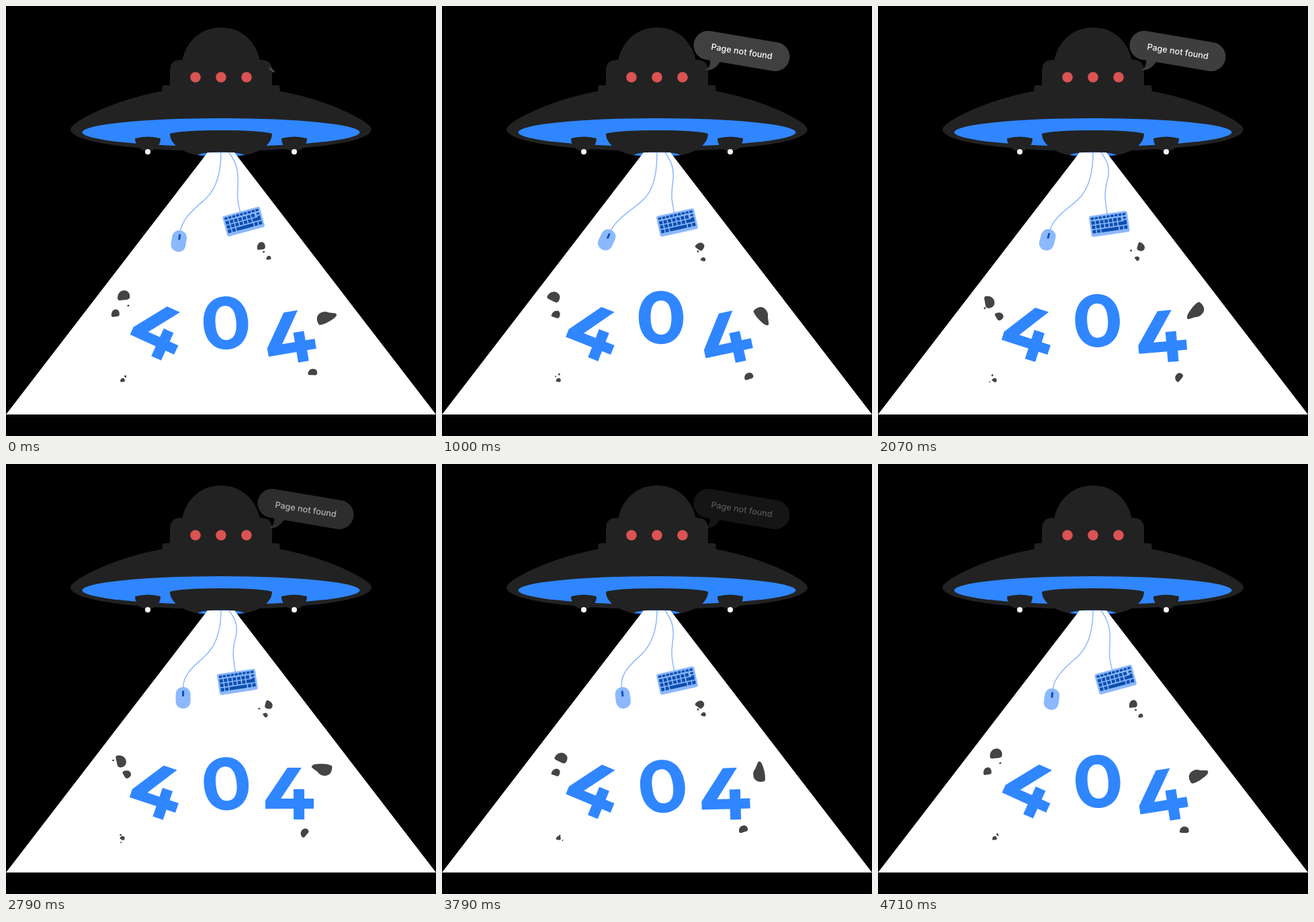
Write an HTML page that moves like this. It is 640 px wide and 640 px high and loops after 4.78 s.

```html
<!DOCTYPE html>
<html lang="en">
<head>
<meta charset="utf-8">
<title>Page not found</title>
<style>
  html, body { margin: 0; height: 100%; overflow: hidden; background: #000; }
  svg { display: block; width: 100%; height: 100%; }
  text { font: 500 12.7px Inter, "Open Sans", sans-serif; fill: #fff; text-anchor: middle; }
</style>
</head>
<body>
<svg viewBox="0 0 640 640">
  <defs>
    <path id="four" d="M-36 22.5V10L-3-38.5H18L-13 7.5H6V-6.5H22V7.5H36V22.5H22V38.5H6V22.5Z"/>
    <path id="pod" d="M192 197Q211 192 230 197C230 208 222 216 211 216S192 208 192 197Z"/>
  </defs>

  <g fill="#222">
    <path d="M262 82C268 52 290 32 320 32S372 52 378 82Z"/>
    <path d="M244 122V96Q244 80 262 80H378Q396 80 396 96V122Z"/>
    <rect x="232.500" y="118" width="175" height="14" rx="3"/>
    <path d="M236 126C180 136 130 156 104 174Q96 180 96 184C98 204 200 216 320 216S542 204 544 184Q544 180 536 174C510 156 460 136 404 126Z"/>
    <ellipse cx="320" cy="188" rx="206.500" ry="21" fill="#3086ff"/>
    <path d="M244 190Q262 185 320 185T396 190C396 205 380 217 356 222Q320 226 284 222C260 217 244 205 244 190Z"/>
    <use href="#pod"/>
    <use href="#pod" x="218"/>
  </g>
  <path d="M285 222Q292 217.500 320 217.500T355 222Q320 226 285 222Z" fill="#3086ff"/>
  <g fill="#db5353">
    <circle cx="282" cy="106" r="7.800"/><circle cx="320" cy="106" r="7.800"/><circle cx="358" cy="106" r="7.800"/>
  </g>
  <g fill="#fff">
    <circle cx="211" cy="217" r="4"/><circle cx="429" cy="217" r="4"/>
    <path d="M300 218H340L640 608H0Z"/>
  </g>

  <g id="bubble">
    <g fill="#404040">
      <path d="M396 58.500L496 75.500" stroke="#404040" stroke-width="43" stroke-linecap="round"/>
      <path d="M399 80C400 89 396 94 391 95C401 97 408 92 414 83Z"/>
    </g>
    <text transform="translate(445.500 72) rotate(9)">Page not found</text>
  </g>

  <g fill="none" stroke="#8cb8ff" stroke-width="1.500">
    <path id="mouseCable"/><path id="boardCable"/>
  </g>
  <g id="mouse">
    <rect x="-11" y="-16" width="22" height="32" rx="10.500" fill="#8cb8ff"/>
    <rect x="-1.500" y="-10.500" width="3" height="8.500" rx="1" fill="#0d4fae"/>
  </g>
  <g id="board">
    <rect x="-28.750" y="-15.750" width="57.500" height="31.500" rx="3" fill="#8cb8ff"/>
    <path id="keys" fill="#0d4fae"/>
  </g>

  <g id="rocks" fill="#444"></g>

  <g fill="#3086ff">
    <use id="left" href="#four"/>
    <path id="zero" fill-rule="evenodd" d="M0-39.600C19-39.600 33.200-25 33.200 0S19 39.600 0 39.600-33.200 25-33.200 0-19-39.600 0-39.600ZM0-25.500C-10-25.500-15.500-17-15.500 0S-10 25.500 0 25.500 15.500 17 15.500 0 10-25.500 0-25.500Z"/>
    <use id="right" href="#four"/>
  </g>
</svg>
<script>
const LOOP = 4780;
const $ = id => document.getElementById(id);
const rad = deg => deg * Math.PI / 180;
const place = (el, x, y, turn = 0, rest = '') =>
  el.setAttribute('transform', `translate(${x} ${y}) rotate(${turn}) ${rest}`);

// Keyboard keys
const key = (x, y, w, h) => `M${x} ${y}h${w}v${h}h${-w}Z`;
let keys = '';
for (let i = 0; i < 9; i++) keys += key(-26.2 + i * 5.95, -13, 4.5, 3.4);
for (let i = 0; i < 7; i++) keys += key(-26.2 + i * 6.6, -7.4, 5, 5);
for (let i = 0; i < 6; i++) keys += key(-26.2 + i * 6.6, -0.9, 5, 5);
keys += key(21.4, -7.4, 4.5, 3) + 'M22-2.600H26V4.100H13.500V-.9H22Z';
for (const x of [-26.2, -19.6, 14.6, 21.2]) keys += key(x, 5.8, 5, 5);
keys += key(-13, 5.8, 26, 5);
$('keys').setAttribute('d', keys);

// Rocks drift on ellipses: x = cx + ax cos(a + px), y = cy + ay cos(a + py)
const BLOB = 'M-1 .5C-1-.3-.6-1 .1-1 .8-1 1-.3 1 .2 1 .9.4.8-.2.9-.7 1-1 1-1 .5Z';
const DROP = 'M-14.500-1Q-13-7-7-9Q-2-11 3-8.500L12-7.500Q16-7 14-3Q12 0 5 4Q-3 9-10 10Q-12 10-13 7Q-15 3-14.500-1Z';
const Q = Math.PI / 2;
const sway = (mid, amp) => a => mid + amp * Math.cos(a);
const spin = a => a * 180 / Math.PI;
const rocks = [
  // cx, ax, px, cy, ay, py, rx, ry, turn, shape
  [474, 3.5, -.33, 458.7, 6.5, -.33, 1, 1, spin, DROP],
  [451, 7, -.66, 548, 5, -.66 - Q, 6.8, 5.1, sway(-20, 28)],
  [385.8, -6, 0, 358, -.8, 0, 6, 6, sway(60, -60)],
  [380, 3.6, 0, 365, 1, 0, 1.5, 1.4, spin],
  [388.4, 2.6, .1, 374.8, 2.3, -Q, 3.5, 3.1, sway(30, -30)],
  [170, 12, 0, 446, 9.5, -Q, 1.5, 1.4, spin],
  [171.5, 6.8, 1, 436.5, -6, -.4, 9.1, 7.6, sway(45, -45)],
  [172.2, -9.3, 0, 459.6, -2.3, 0, 6, 5.7, sway(35, -35)],
  [173.5, 0, 0, 556.8, 0, 0, 3.4, 3.1, sway(20, -20)],
  [173.8, 3.8, .1, 550.8, 2.7, Q, 1.5, 1.4, spin],
  [173, 7.3, .795, 557, 6.5, .795 + Q, 1, 1, spin],
].map(([cx, ax, px, cy, ay, py, rx, ry, turn, shape = BLOB]) => {
  const el = document.createElementNS('http://www.w3.org/2000/svg', 'path');
  el.setAttribute('d', shape);
  $('rocks').append(el);
  return a => place(el, cx + ax * Math.cos(a + px), cy + ay * Math.cos(a + py),
    turn(a), `scale(${rx} ${ry})`);
});

function draw(t) {
  const a = t / LOOP * 2 * Math.PI, s = Math.sin(a), c = Math.cos(a);

  // Digits
  place($('left'), 253, 500, 21.2 + 3.2 * Math.cos(a + .158), 'translate(-30.8 -4.2)');
  place($('zero'), 327.2 - 1.2 * s, 471.7 - 8.3 * s, -4 + 3.5 * s);
  place($('right'), 442, 488, -6 - 6.5 * Math.cos(a - 1), 'translate(-20 2.5)');

  // Mouse and its cable
  const mTurn = 8.5 + 16.5 * s, mx = 257.3 - 12.5 * s, my = 348 + 2 * ((1 + c) / 2) ** 8;
  const ux = Math.sin(rad(mTurn)), uy = -Math.cos(rad(mTurn));
  place($('mouse'), mx, my, mTurn);
  const kx = 296 + 2 * s, ky = 288 + 2 * s;
  $('mouseCable').setAttribute('d', `M320 218C320 250 ${kx + 17} ${ky - 15} ${kx} ${ky}
    S${mx + ux * 34} ${my + uy * 34} ${mx + ux * 15} ${my + uy * 15}`);

  // Keyboard and its cable
  const bTurn = -11.6 - 3.6 * c, bx = 348.7 + 4.9 * c, by = 322.7 - 1.8 * c;
  const vx = Math.sin(rad(bTurn)), vy = -Math.cos(rad(bTurn));
  place($('board'), bx, by, bTurn);
  const nx = 343.4 + 1.9 * c, bend = 2.6 - 2.8 * c;
  $('boardCable').setAttribute('d', `M332 218C339 228 ${nx + bend} 238 ${nx} 258
    S${bx - 1 + vx * 41} ${by + vy * 41} ${bx - 1 + vx * 15} ${by + vy * 15}`);

  // Speech bubble pops out of its tail, then fades
  const u = Math.min(1, (t + 20) / 560), grow = 1 - (1 - u) ** 2;
  place($('bubble'), 391, 95, 32 * (1 - grow), `scale(${grow}) translate(-391 -95)`);
  $('bubble').setAttribute('opacity', Math.max(0, Math.min(1, 1 - (t - 2000) / 2680)));

  rocks.forEach(move => move(a));
}

const start = performance.now();
function tick() {
  draw((performance.now() - start) % LOOP);
  requestAnimationFrame(tick);
}
tick();
</script>
</body>
</html>
```
